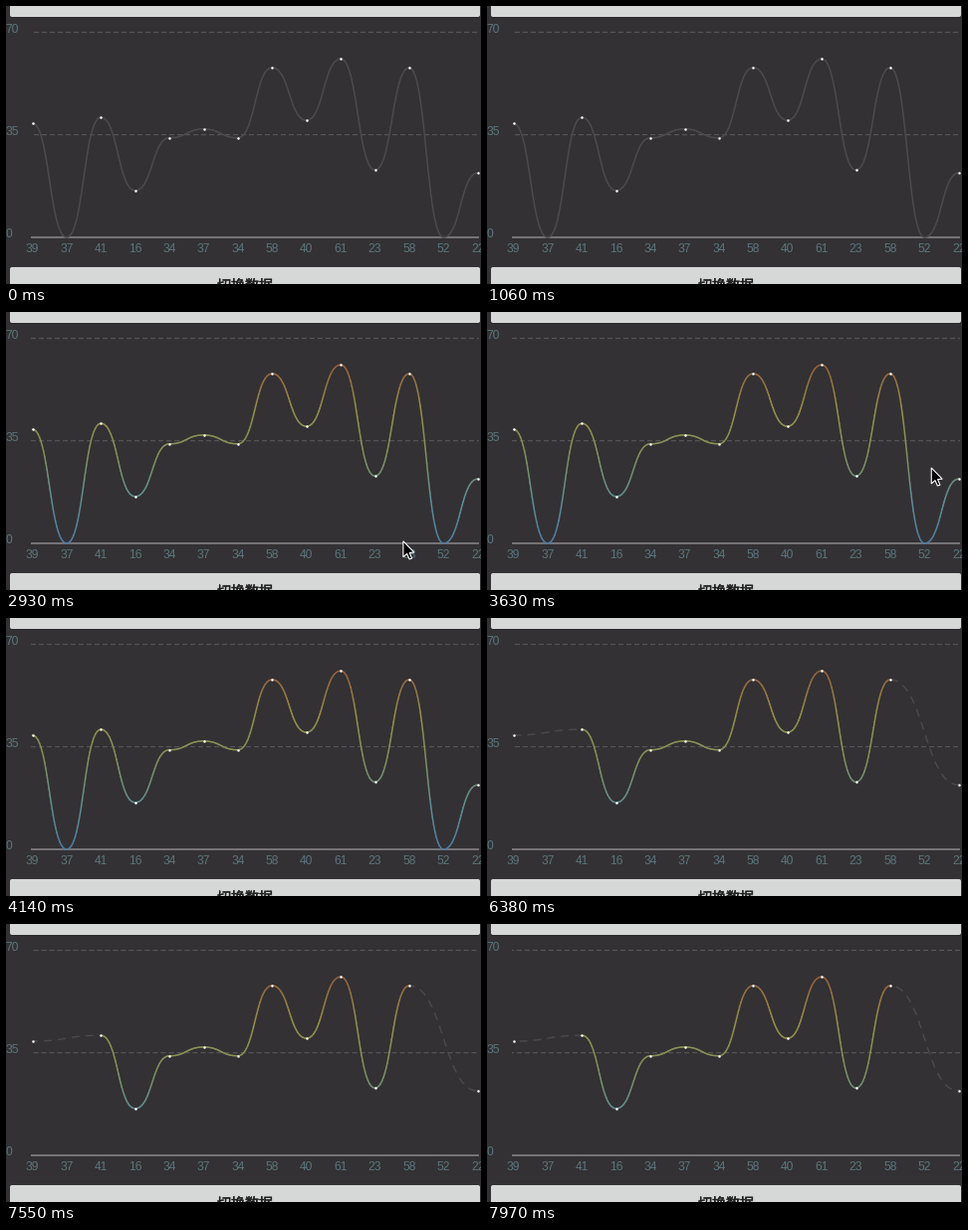
A matplotlib script that plays this animation: 477x280 px, repeating every 8 s.

```python
import numpy as np
import matplotlib.pyplot as plt
from matplotlib.animation import FuncAnimation
from matplotlib.collections import LineCollection
from matplotlib.colors import LinearSegmentedColormap, to_rgb
from matplotlib.patches import FancyBboxPatch, Polygon
from matplotlib.patheffects import withStroke

W, H, DPI = 477, 280, 64
PT = 72 / DPI  # points per pixel
STEP, LOOP = 40, 8000

BG, BUTTON, SHADOW, INK = "#333133", "#d6d7d7", "#2b292b", "#1e1e1e"
LABEL, GRID, AXIS, IDLE = "#5b767e", "#555557", "#8b8a8b", "#4b4a4c"
HEAT = LinearSegmentedColormap.from_list(
    "heat", ["#507ba6", "#5f8f94", "#82905a", "#97904a", "#96603f"])

LEFT, GAP, BASE, HEIGHT, MAX = 26.5, 34.4, 233, 206.3, 70
LABELS = [39, 37, 41, 16, 34, 37, 34, 58, 40, 61, 23, 58, 52, 22]
COUNT = len(LABELS)
MISSING = (1, COUNT - 2)
VALUES = [0 if i in MISSING else v for i, v in enumerate(LABELS)]
KNOWN = [i for i in range(COUNT) if i not in MISSING]

COLOR_AT, FADE, SWITCH_AT = 2570, 360, 6380
BEAT, FLOW = 125, 1.83  # dashes move FLOW pixels on every BEAT
CURSOR_T = [1870, 2270, 2570, 2930, 3080, 3400, 3750, 4020]
CURSOR_X = [82, 62, 62, 390, 436, 436, 451, 44]
CURSOR_Y = [261, 229, 229, 231, 230, 230, 123, 259]
ARROW = np.array([(0, 0), (0, 16), (3.7, 12.6), (6.2, 18.2), (8.7, 17.2),
                  (6.3, 11.6), (11, 11.3)])

plt.rcParams["lines.scale_dashes"] = False


def px(i):
    return LEFT + GAP * np.asarray(i)


def py(v):
    return BASE - np.asarray(v) * HEIGHT / MAX


def smooth(indices, n=26):
    """Bezier chain with level tangents at every data point."""
    t = np.linspace(0, 1, n)
    parts = []
    for a, b in zip(indices, indices[1:]):
        x = px(a) + (px(b) - px(a)) * (1.5 * t * (1 - t) + t ** 3)
        y = py(VALUES[a] + (VALUES[b] - VALUES[a]) * t * t * (3 - 2 * t))
        parts.append(np.column_stack([x, y]))
    return np.concatenate(parts)


def heat_curve(indices):
    pts = smooth(indices)
    segs = np.stack([pts[:-1], pts[1:]], axis=1)
    level = (BASE - segs[:, :, 1].mean(axis=1)) / (BASE - py(max(VALUES)))
    colors = HEAT(level)[:, :3]
    lines = LineCollection(segs, colors=colors, linewidths=1.5 * PT,
                           capstyle="round", zorder=3)
    ax.add_collection(lines)
    return lines, colors


def dashed(x, y, color, width):
    return ax.plot(x, y, color=color, lw=width * PT, dash_capstyle="butt",
                   snap=False, zorder=1)[0]


def set_dash(line, on, off, shift):
    line.set_linestyle((-shift % (on + off) * PT, (on * PT, off * PT)))


def button(y, height):
    for dy, color in ((1.2, SHADOW), (0, BUTTON)):
        ax.add_patch(FancyBboxPatch(
            (6, y + 2 + dy), 468, height - 4, lw=0, fc=color,
            boxstyle="round,pad=2,rounding_size=2"))


def label(x, y, value, align):
    ax.text(x, y, str(value), color=LABEL, family="Liberation Sans",
            fontsize=12 * PT, ha=align, va="baseline")


fig = plt.figure(figsize=(W / DPI, H / DPI), dpi=DPI, facecolor=BG)
ax = fig.add_axes([0, 0, 1, 1])
ax.set_xlim(0, W)
ax.set_ylim(H, 0)
ax.axis("off")

button(-30, 41)
button(263, 40)
ax.text(240, 286, "切换数据", family="Noto Sans CJK JP", fontsize=14 * PT,
        color=INK, ha="center", va="baseline",
        path_effects=[withStroke(linewidth=0.4 * PT, foreground=INK)])

ax.plot([25, 475], [BASE, BASE], color=AXIS, lw=1.5 * PT,
        solid_capstyle="butt", zorder=1)
grid = [dashed([25, 475], [y, y], GRID, 1.2)
        for y in py([MAX, MAX / 2]) - 0.2]
for value in (MAX, MAX // 2, 0):
    label(-0.4, py(value) + 0.3, value, "left")
for i, value in enumerate(LABELS):
    label(px(i), 248.3, value, "center")

full, heat = heat_curve(range(COUNT))
partial, _ = heat_curve(KNOWN[1:-1])
gaps = [dashed(*smooth(pair).T, IDLE, 1.4) for pair in (KNOWN[:2], KNOWN[-2:])]
ax.scatter(px(KNOWN), py([VALUES[i] for i in KNOWN]), s=(2.5 * PT) ** 2,
           c="white", lw=0, zorder=4)
cursor = ax.add_patch(Polygon(ARROW, fc="black", ec="white", lw=1.1 * PT,
                              joinstyle="miter", zorder=6))


def draw(frame):
    t = (frame + 1) * STEP - 1
    switched = t >= SWITCH_AT
    fade = np.clip((t - COLOR_AT) / FADE, 0, 1)
    full.set_color((1 - fade) * np.array(to_rgb(IDLE)) + fade * heat)
    full.set_visible(not switched)
    partial.set_visible(switched)

    flow = FLOW * ((t - SWITCH_AT) // BEAT) if switched else 3 * fade
    for line in grid:
        set_dash(line, 5, 3, 3 - flow)
    for line in gaps:
        set_dash(line, 8, 6, -flow)
        line.set_visible(switched)

    cursor.set_visible(CURSOR_T[0] <= t < CURSOR_T[-1] + BEAT)
    cursor.set_xy(ARROW + [np.interp(t, CURSOR_T, CURSOR_X),
                           np.interp(t, CURSOR_T, CURSOR_Y)])
    return [full, partial, cursor, *gaps, *grid]


anim = FuncAnimation(fig, draw, frames=LOOP // STEP, interval=STEP,
                     repeat=True, repeat_delay=0, blit=False)
plt.show()
```
